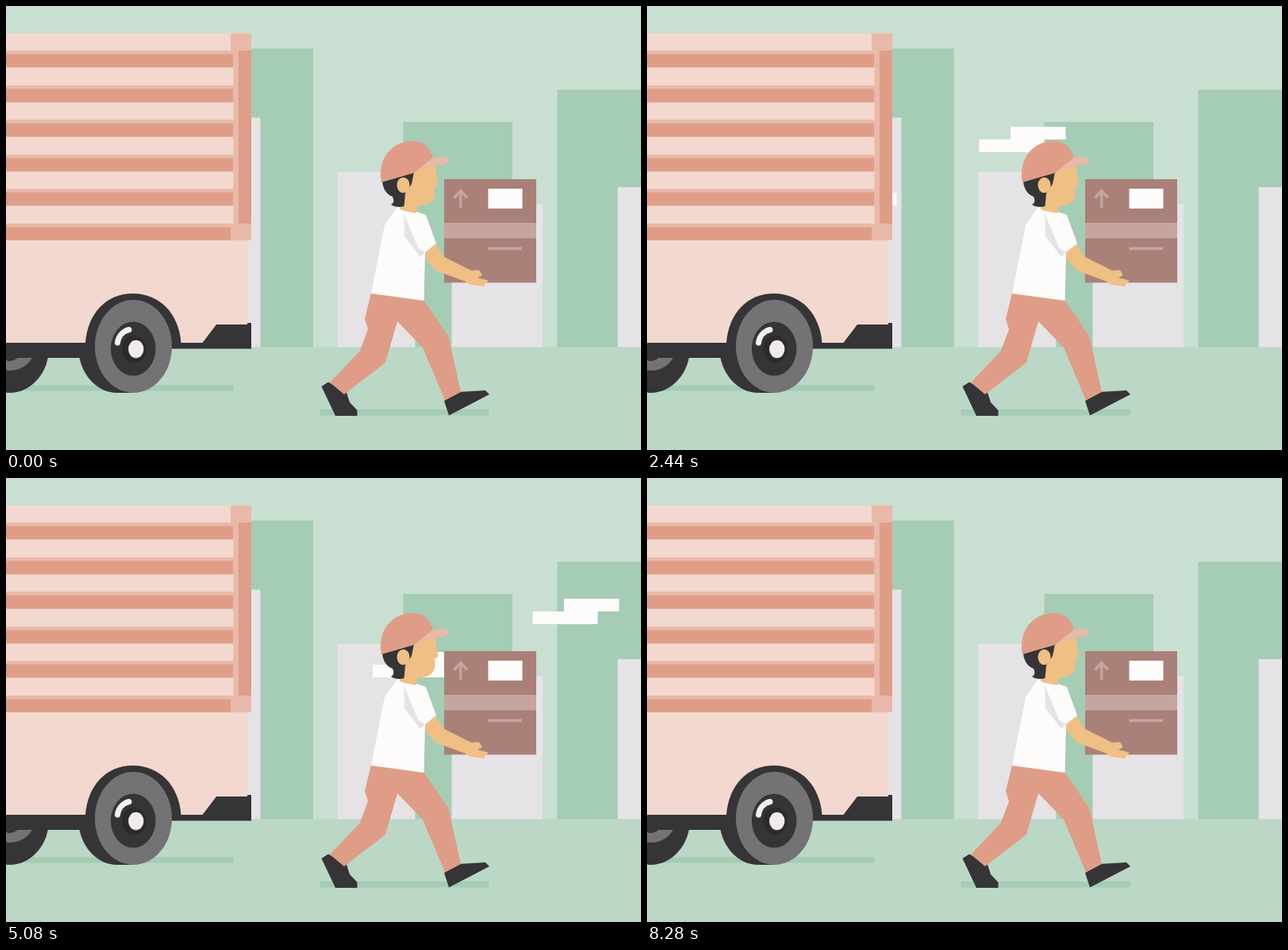
These frames come from a looping animation (800 by 559 pixels, 8320 ms). An HTML page:

```html
<!DOCTYPE html>
<html lang="en">
<head>
<meta charset="utf-8">
<title>Delivery</title>
<style>
  html, body { margin: 0; width: 100%; height: 100%; overflow: hidden; background: #c9dfd2; }
  svg { display: block; width: 800px; height: 559px; }
  .sky { fill: #c9dfd2; }
  .ground { fill: #bbd7c6; }
  .green { fill: #a5ccb4; }
  .gray { fill: #e5e3e6; }
  .white { fill: #fdfcfb; }
  .pale { fill: #f2d8ce; }
  .mid { fill: #e8b9a9; }
  .coral { fill: #df9d87; }
  .dark { fill: #353436; }
  .tyre { fill: #747275; }
  .skin { fill: #efbf84; }
  .card { fill: #a98179; }
  .tape { fill: #c4a59f; }
</style>
</head>
<body>
<svg viewBox="0 0 800 559">
  <rect class="sky" width="800" height="430"/>
  <rect class="ground" y="429.5" width="800" height="130"/>

  <g id="city">
    <path class="green" d="M300 53.5H387V429.5H300ZM500.5 146H638V429.5H500.5ZM694.5 105.5H800V429.5H694.5Z"/>
    <path class="gray" d="M300 140.5H320.5V429.5H300ZM417.5 209H515.5V429.5H417.5ZM561.5 250H676V429.5H561.5ZM770.5 228H800V429.5H770.5Z"/>
  </g>

  <g class="white">
    <path id="high" d="M0 152H69.5V168H42.5V184H-39.5V168H0Z"/>
    <path id="low" d="M0 219H69.5V235H96V251H-42.6V235H0Z"/>
  </g>

  <path class="green" d="M0 477.5H286.5V484.5H0ZM395.5 508H608.5V515.5H395.5Z"/>

  <g id="truck">
    <rect class="pale" y="290" width="304" height="134"/>
    <rect class="pale" y="34.5" width="309" height="260.5"/>
    <g id="slats"></g>
    <rect class="mid" x="286.5" y="56" width="7" height="220"/>
    <rect class="coral" x="293" y="56" width="16" height="220"/>
    <path class="mid" d="M283 34.5H309V56H283ZM283 274H309V295H283Z"/>

    <ellipse class="dark" cx="5" cy="428.5" rx="49.5" ry="58.5" clip-path="url(#below)"/>
    <ellipse class="tyre" cx="5" cy="428" rx="32" ry="31" clip-path="url(#below)"/>
    <ellipse class="dark" cx="5" cy="428" rx="15" ry="19" clip-path="url(#below)"/>
    <clipPath id="below"><rect y="430" width="100" height="70"/></clipPath>
    <path class="dark" d="M0 424H247.500L265 401H304V399H309V431.500H110V443H0Z"/>
    <path class="dark" d="M100 424C103 386 127 362 160 362C194 362 218 388 220.500 424V431H100Z"/>
    <path class="dark" d="M140 370H160.500V487H140C113 487 91 461 91 428.500S113 370 140 370Z" clip-path="url(#wheel)"/>
    <clipPath id="wheel"><rect x="85" y="424" width="130" height="70"/></clipPath>
    <ellipse class="tyre" cx="160.500" cy="428.500" rx="48.500" ry="58.500"/>
    <ellipse class="dark" cx="160.200" cy="431.500" rx="28.300" ry="34"/>
    <ellipse cx="161.500" cy="432" rx="15" ry="17.500" fill="#2b2a2c"/>
    <ellipse cx="163.800" cy="432" rx="9.700" ry="11.200" fill="#f0eaea"/>
    <path d="M140.500 424C141.500 416 147 409.500 155 407.500" fill="none" stroke="#f5f0f0" stroke-width="7" stroke-linecap="round"/>
  </g>

  <g id="box">
    <rect class="card" x="552" y="218" width="116" height="130.300"/>
    <path class="tape" d="M552 273H668V292.500H552ZM607.500 303.500H650V307.300H607.500Z"/>
    <rect class="white" x="607.500" y="230" width="43" height="25"/>
    <path d="M572.700 254V233M564.500 241.500L572.700 232.500L581 241.500" fill="none" stroke="#c4a59f" stroke-width="3.500"/>
  </g>

  <g id="man">
    <path class="dark" d="M397.500 479L406 473.500L429 486.500L433 499L442.500 509V516H415ZM552 497L570 486L604 484L609 489L558 515.500Z"/>
    <path class="coral" d="M460 361L526 370L557.500 416L573 486L553 496.500L525 430L493 397L478 449L426 489L408 474L446 434L456 407L452 394Z"/>
    <path class="skin" d="M526 311L541 300L552 316L586 333L596 332.500L600 339L594 342L607.500 345.500L602 353L585 351L577 346L541 333L529 318Z"/>
    <path class="white" d="M493 253L517 259L529 263L542 299L528 310L526.500 371L460 362L477 276Z"/>
    <path class="gray" d="M501 261L502 290L522 316L528 310L519.500 305Z"/>
    <path class="skin" d="M512 208L541 197L542 212L544.500 225L539.500 228C541 233 541 237 539 242C536 249 528 251 519 251.500L516.500 261C508 259 500 258 496 256L500 232Z"/>
    <path class="dark" d="M472 221L514 209L511 224L503 236L501.500 252C496 254 489 253 485 250C489 248 489 245 487 240C479 237 475 230 474 221Z"/>
    <ellipse class="skin" cx="500.500" cy="225.500" rx="8" ry="9.800"/>
    <path class="coral" d="M473 222C467 192 487 170 513 170C527 170 535 180 538 192L514.500 210Z"/>
    <path class="mid" d="M514.500 210L537 191.500C546 188.500 557 190 557.500 195C556 203 536 198 514.500 210Z"/>
  </g>
</svg>
<script>
  const LOOP = 8320, TICK = 40;

  // [time in ms, x of the upper slab]
  const highPath = [[0, 229.5], [1040, 326.5], [2440, 458], [3600, 564.5], [5080, 703], [8320, 1005]];
  const lowPath = [[0, -41], [2440, 218.5], [3600, 342], [5080, 504.6], [6840, 698], [8240, 843], [8320, 852]];

  const high = document.getElementById("high");
  const low = document.getElementById("low");

  const slats = [56, 100, 143.3, 187, 230.2, 274];
  document.getElementById("slats").innerHTML = slats.map(y =>
    `<rect class="mid" y="${y}" width="286.5" height="4.600"/>` +
    `<rect class="coral" y="${y + 4.3}" width="286.5" height="${y > 270 ? 16.7 : 17}"/>`
  ).join("");

  function at(path, t) {
    let i = 1;
    while (i < path.length - 1 && path[i][0] < t) i++;
    const [t0, x0] = path[i - 1], [t1, x1] = path[i];
    return x0 + (x1 - x0) * (t - t0) / (t1 - t0);
  }

  function draw(now) {
    const t = Math.floor((now % LOOP) / TICK) * TICK;
    high.setAttribute("transform", `translate(${at(highPath, t)})`);
    low.setAttribute("transform", `translate(${at(lowPath, t)})`);
    requestAnimationFrame(draw);
  }
  draw(performance.now());
</script>
</body>
</html>
```
